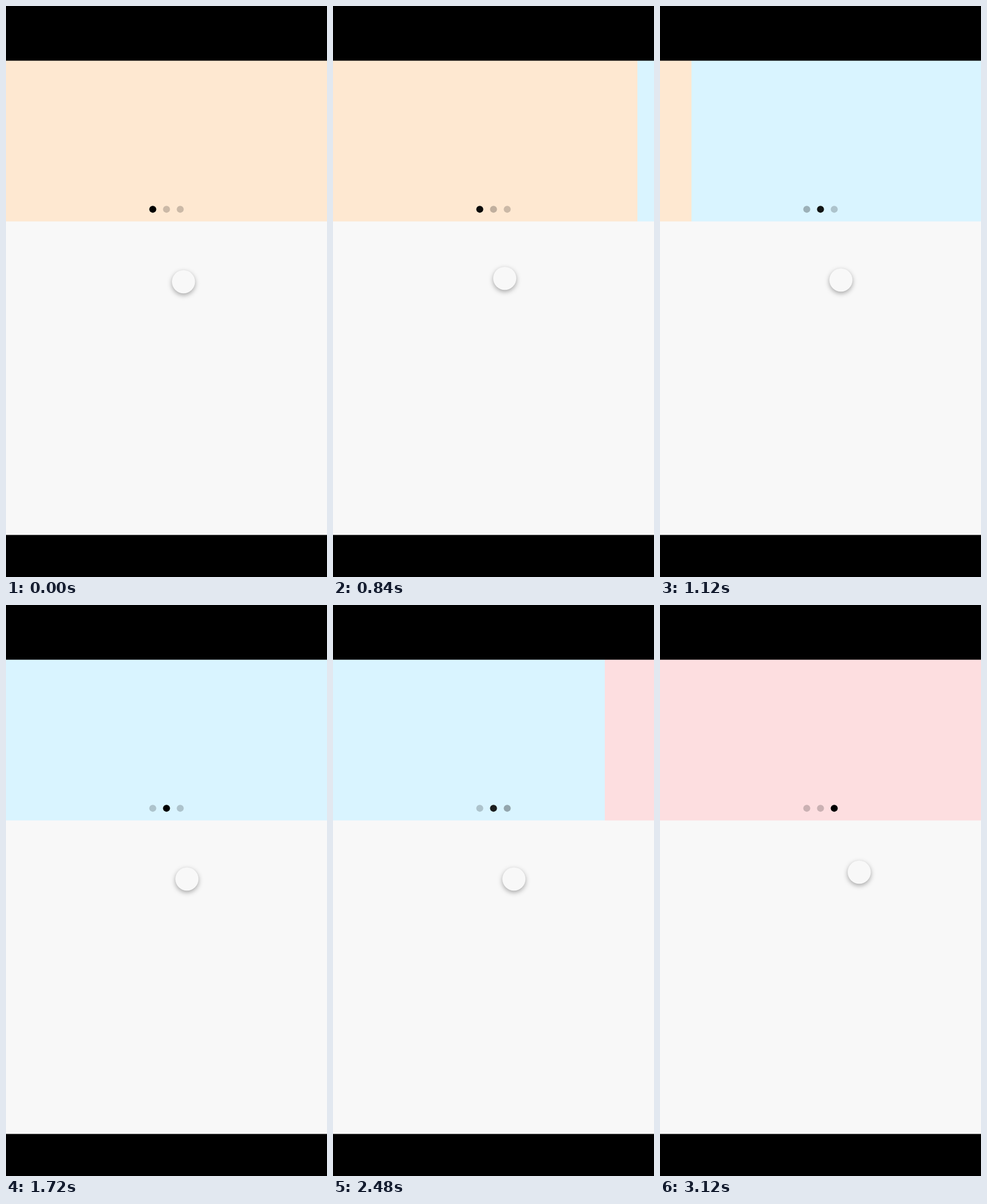
Write an HTML page with a canvas that moves like this. It is 561 px wide and 998 px high and loops after 3200 ms.

```html
<!DOCTYPE html>
<html lang="en">
<head>
<meta charset="utf-8">
<title>Carousel</title>
<style>
  html, body { margin: 0; width: 100%; height: 100%; overflow: hidden; background: #000; }
  canvas { display: block; }
</style>
</head>
<body>
<canvas id="stage" width="561" height="998"></canvas>
<script>
const ctx = document.getElementById('stage').getContext('2d');
const W = 561, H = 998, LOOP = 3200;
const TOP = 95.6, FOLD = 376.5, BOTTOM = 924.5;
const PAPER = '#f8f8f8';
const PAGES = ['#fee8d1', '#d9f4ff', '#fddee0'];
const SLIDES = [765, 2363], SLIDE_MS = 560;
const TAPS = [390, 1990];

// Pointer moves: start, end, x, y
const START = [310, 482];
const MOVES = [
  [225, 440, 294, 475],
  [800, 920, 316, 479],
  [2481, 2550, 348, 471],
  [3005, 3080, 348, 467]
];

const clamp = v => Math.max(0, Math.min(1, v));
const mix = (a, b, k) => a + (b - a) * k;
const ramp = (t, a, b) => clamp((t - a) / (b - a));
const smooth = k => k * k * (3 - 2 * k);
const easeOut = k => 1 - (1 - k) * (1 - k);

// cubic-bezier(.4, 0, .2, 1)
function standardEase(x) {
  if (x <= 0 || x >= 1) return clamp(x);
  let lo = 0, hi = 1;
  for (let i = 0; i < 24; i++) {
    const s = (lo + hi) / 2, r = 1 - s;
    if (1.2 * r * r * s + 0.6 * r * s * s + s * s * s < x) lo = s;
    else hi = s;
  }
  return lo * lo * (3 - 2 * lo);
}

function pagePosition(t) {
  return SLIDES.reduce((sum, at) => sum + standardEase((t - at) / SLIDE_MS), 0);
}

function pointerAt(t) {
  let [x, y] = START;
  MOVES.forEach(([from, to, nx, ny], i) => {
    const k = (i < 2 ? smooth : easeOut)(ramp(t, from, to));
    x = mix(x, nx, k);
    y = mix(y, ny, k);
  });
  return [x, y];
}

function pressAt(t) {
  return TAPS.reduce((sum, at) =>
    sum + easeOut(ramp(t, at, at + 165)) - easeOut(ramp(t, at + 285, at + 415)), 0);
}

function disc(x, y, r) {
  ctx.beginPath();
  ctx.arc(x, y, r, 0, Math.PI * 2);
  ctx.fill();
}

function drawPages(pos) {
  PAGES.forEach((color, i) => {
    const x = Math.round((i - pos) * W);
    if (x >= W || x <= -W) return;
    ctx.fillStyle = color;
    ctx.fillRect(x, TOP, W, FOLD - TOP);
  });
}

function drawDots(pos) {
  PAGES.forEach((_, i) => {
    const active = clamp(1 - Math.abs(i - pos));
    ctx.fillStyle = `rgba(0, 0, 0, ${mix(0.2, 1, active)})`;
    disc(256.5 + i * 24, 355.3, 6.1);
  });
}

function drawPointer(t) {
  const [x, y] = pointerAt(t), press = pressAt(t);
  ctx.save();
  ctx.shadowColor = 'rgba(0, 0, 0, 0.34)';
  ctx.shadowOffsetY = mix(3, 1.5, press);
  ctx.shadowBlur = mix(9, 4.5, press);
  ctx.fillStyle = PAPER;
  disc(x + 0.2, y, mix(20.2, 19, press));
  ctx.restore();
}

function draw(t) {
  const pos = pagePosition(t);
  ctx.fillStyle = '#000';
  ctx.fillRect(0, 0, W, H);
  ctx.fillStyle = PAPER;
  ctx.fillRect(0, FOLD - 0.5, W, BOTTOM - FOLD + 0.5);
  drawPages(pos);
  drawDots(pos);
  drawPointer(t);
}

const began = performance.now();
function tick() {
  draw((performance.now() - began) % LOOP);
  requestAnimationFrame(tick);
}
tick();
</script>
</body>
</html>
```
